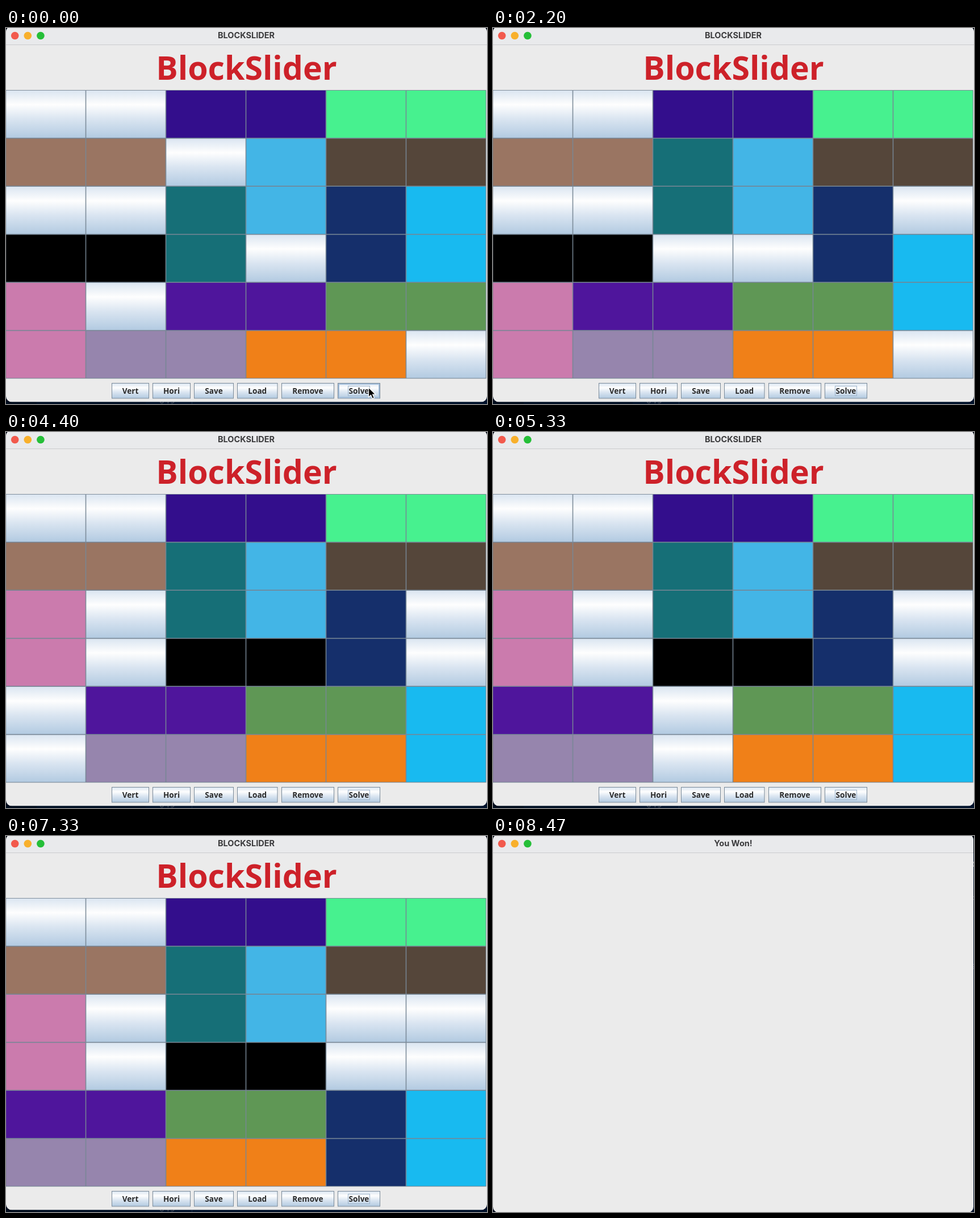
An HTML page for the animation above (8.87 s loop, 847 by 661 pixels).

```html
<!DOCTYPE html>
<html lang="en">
<head>
<meta charset="utf-8">
<title>BlockSlider</title>
<style>
  html, body { margin: 0; width: 100%; height: 100%; overflow: hidden; background: #001e47; }
  svg { display: block; width: 847px; height: 661px; }
  text { white-space: pre; }
  .ui { font-family: Inter, "Open Sans", sans-serif; font-size: 14.5px; }
  .code { font-family: "DejaVu Sans Mono", monospace; font-size: 15.8px; }
  .swing { font-family: "Open Sans", "Noto Sans", sans-serif; font-weight: 700; }
  .icon { fill: none; stroke: #7288a5; stroke-width: 1.6; stroke-linejoin: round; }
</style>
</head>
<body>
<svg id="stage" viewBox="0 0 847 661" xmlns="http://www.w3.org/2000/svg">
  <defs>
    <linearGradient id="ocean" x1="0" y1="0" x2="0" y2="1">
      <stop offset="0" stop-color="#dae5f1"/>
      <stop offset=".3" stop-color="#fefefe"/>
      <stop offset=".6" stop-color="#dae5f1"/>
      <stop offset="1" stop-color="#b2cae1"/>
    </linearGradient>
  </defs>
  <g id="editor"></g>
  <rect id="shade" width="847" height="661" opacity=".4"/>
  <g id="game"></g>
  <g id="won"></g>
  <path id="cursor" d="M0 0V17L4 13.3L6.8 19.6L9.8 18.3L7.1 12.2H12.4Z" stroke="#fff" stroke-width="1.2"/>
</svg>
<script>
const LOOP = 8870;
const $ = id => document.getElementById(id);
const escape = s => s.replace(/&/g, '&amp;').replace(/</g, '&lt;');
const rect = (x, y, w, h, fill, extra = '') =>
  `<rect x="${x}" y="${y}" width="${w}" height="${h}" fill="${fill}" ${extra}/>`;
const circle = (x, y, r, fill, extra = '') => `<circle cx="${x}" cy="${y}" r="${r}" fill="${fill}" ${extra}/>`;
const path = (d, color, width = 1.3) => `<path d="${d}" fill="none" stroke="${color}" stroke-width="${width}"/>`;
const text = (x, y, s, fill, cls = 'ui', extra = '') =>
  `<text x="${x}" y="${y}" fill="${fill}" class="${cls}" ${extra}>${escape(s)}</text>`;
const lights = (...colors) => colors.map((c, i) => circle(15.7 + 22.6 * i, 13.5, 6.8, c)).join('');

// ---- Code editor behind the game ----
const COL = 9.51, LINE = 23.67, CODE_X = 327;
const source = [
  [626, 8, 'this.btn[row2][col2].setBackground(color);'],
  [627, 4, '}'],
  [630, 4, '// MODIFIES: this'],
  [631, 4, '// EFFECTS: find and return the button that is pressed'],
  [632, 4, 'private JButton findButton(ActionEvent e) {'],
  [633, 8, 'int i = 0;'],
  [634, 8, 'int j = 0;'],
  [635, 8, 'for (; i < this.size; i++) {'],
  [636, 12, 'for (; j < this.size; j++) {'],
  [638, 16, 'if (e.getSource() == this.btn[i][j]) {'],
  [639, 20, 'this.currRow = i;'],
  [640, 20, 'this.currColumn = j;'],
  [641, 20, 'return this.btn[i][j];'],
  [642, 16, '}'],
  [644, 12, '}'],
  [645, 12, 'j = 0;'],
  [646, 8, '}'],
  [647, 8, 'return null;'],
  [648, 4, '}']
];
const lineY = n => 109.5 + (n - 626) * LINE;

function highlighter() {
  const brackets = ['#ffd700', '#da70d6', '#2fa4f5'];
  let depth = 2;
  const color = (token, rest) => {
    if (token.startsWith('//')) return '#667bab';
    if (/^[([{]$/.test(token)) return brackets[depth++ % 3];
    if (/^[)\]}]$/.test(token)) return brackets[--depth % 3];
    if (/^(private|int|for|if|return)$/.test(token)) return '#e9d9ff';
    if (/^(\d+|null)$/.test(token)) return '#ffc58f';
    if (/^[A-Z]/.test(token)) return '#ffeead';
    if (/^\w/.test(token)) return rest.startsWith('(') ? '#ffeead' : '#ff9da4';
    return /[=<+]/.test(token) ? '#99ffff' : '#e8efff';
  };
  return line => line.replace(/\/\/.*|\w+|[=<+]+|\s+|./g, (token, at) =>
    `<tspan fill="${color(token, line.slice(at + token.length))}">${escape(token)}</tspan>`);
}

const chevron = (x, y, open) =>
  path(open ? `M${x - 5} ${y - 2.5}l5 5l5 -5` : `M${x - 2.5} ${y - 5}l5 5l-5 5`, '#b9c7da');
const javaMark = (x, y) => text(x, y + 5, 'J', '#cc3e44', 'ui', 'font-weight="700" text-anchor="middle"');

function sidebar() {
  const GOLD = '#d8a02c', PLAIN = '#d5deec';
  // name, depth, kind (d: folder, j: Java file, other: file), colour, badge
  const tree = [
    ['solver.txt', 1, 'text', PLAIN, 'M'], ['testMT.json', 1, 'json'], ['UML_Design_Diagr...', 1, 'pdf'],
    ['won.jpg', 1, 'image'], ['lib', 0, 'closed'], ['src', 0, 'd', GOLD, '●'], ['gui', 1, 'd', GOLD, '●'],
    ['model', 2, 'd', GOLD, '●'], ['Block.java', 3, 'j', GOLD, '1'],
    ...['BlockTranslator....', 'Board.java', 'Event.java', 'EventLog.java', 'Goalblock.java',
      'Horiblock.java', 'Vertblock.java'].map(n => [n, 3, 'j']),
    ['persistence', 2, 'd'],
    ...['Converter.java', 'JsonReader.java', 'JsonWriter.java', 'Translator.java', 'Writable.java'].map(n => [n, 3, 'j']),
    ['ui', 2, 'd', GOLD, '●']
  ];
  const icons = {
    text: y => path(`M85 ${y - 4}h10M85 ${y}h7M85 ${y + 4}h10`, '#c3cfdf', 1.6),
    json: y => text(82, y + 5, '{}', '#cbcb41', 'ui', 'style="font-size:13px"'),
    pdf: y => circle(88, y, 5, '#cc3e44'),
    image: y => rect(82.5, y - 5, 11, 9, 'none', 'stroke="#a074c4" stroke-width="1.5"') +
      path(`M84 ${y + 3}l4 -4l5 4`, '#a074c4', 1.5)
  };
  const rows = tree.map(([name, depth, kind, color = PLAIN, badge], i) => {
    const y = 103 + 24.8 * i, x = 93 + 9 * depth;
    const folder = kind === 'd' || kind === 'closed';
    const mark = folder ? chevron(x - 13, y, kind === 'd') : kind === 'j' ? javaMark(106, y) : icons[kind](y);
    const note = badge === '●' ? circle(222, y, 4.3, '#5b5b46')
      : badge ? text(222, y + 5, badge, badge === '1' ? '#cc5544' : '#8f9271', 'ui', 'text-anchor="middle" style="font-size:13px"') : '';
    return mark + text(x, y + 5, name, color) + note;
  }).join('');
  return rect(54, 30, 192, 631, '#00193c') + rows +
    rect(54, 69, 192, 25, '#14294a') + chevron(66, 81, true) +
    text(77, 86, 'MAZE-SOLVER', '#dce5f2', 'ui', 'style="font-size:12.6px;font-weight:700"') +
    text(77, 54, 'EXPLORER', '#c2cede', 'ui', 'style="font-size:12.8px"') +
    [214, 220, 226].map(x => circle(x, 49, 1.2, '#c2cede')).join('');
}

function activityBar() {
  const icon = d => `<path class="icon" d="${d}"/>`;
  return rect(0, 30, 54, 631, '#00142f') + rect(0, 30, 2, 54, '#fff') +
    `<path class="icon" style="stroke:#fff;stroke-width:2" d="M22 43h10l6 6v14h-16zM22 50h-6v20h15v-7M32 43v6h6"/>` +
    icon('M24 112a8 8 0 1 1 4 3.5M24 112l-9 11') +
    icon('M21 158v16M21 167q12 0 12 -7') +
    [[21, 155], [21, 176], [33, 158]].map(([x, y]) => circle(x, y, 3, 'none', 'class="icon"')).join('') +
    circle(36.5, 174, 8.5, '#2484d8') + text(36.5, 178, '2', '#fff', 'ui', 'text-anchor="middle" style="font-size:11px;font-weight:700"') +
    icon('M24 215v-9l16 10l-11 8M16 226a5 6 0 0 1 10 0a5 6 0 0 1 -10 0M13 220l4 3M13 227h3M14 234l3 -3M28 220l-3 3M26 227h4M25 231l4 3') +
    icon('M14 267h10v19h-10zM14 276h20v10h-20M30 261h10v10h-10z') +
    icon('M26 336h-11v-19h24v9M20 340h7') + circle(34, 334, 6, 'none', 'class="icon"') + icon('M32 331l-2 3l2 3M36 331l2 3l-2 3') +
    icon('M21 370h12M24 370v8l-7 14h20l-7 -14v-8M20 386h14') +
    [435, 490, 544].map(y => circle(27, y, 9, '#566d8d')).join('');
}

function tabsAndPath() {
  const tabs = [[246, 'test.java'], [381, 'AStar.java'], [518, 'Block.java', '1'], [668, 'Board.java'], [808, 'GUI.java']];
  const ends = [380, 517, 667, 807, 947];
  const bar = tabs.map(([x, name, badge], i) =>
    rect(x, 30, ends[i] - x, 39, i === 4 ? '#001e47' : '#00193c') + javaMark(x + 22, 49) +
    text(x + 36, 54.5, name, badge ? '#d8a02c' : i === 4 ? '#fff' : '#8798b2') +
    (badge ? text(628, 54.5, badge, '#d8a02c', 'ui', 'style="font-size:12.5px"') : '')).join('');
  const crumbs = [[264, 'src'], [303, 'gui'], [342, 'ui'], [397, 'GUI.java'], [493, 'GUI'], [557, 'findButton(ActionEvent)']];
  return rect(246, 30, 601, 39, '#001126') + bar +
    crumbs.map(([x, s]) => text(x, 87, s, '#a0afc5')).join('') +
    [294, 333, 364, 463, 528].map(x => chevron(x, 82, false)).join('') + javaMark(384, 82) +
    path('M474 79l4 -4l4 4l-4 4zM480 79h7M482 79v8h5M485 76h4v5h-4zM485 84h4v5h-4z', '#e59a3c') +
    path('M545 75l6 3v8l-6 4l-6 -4v-8zM539 78l6 4l6 -4M545 82v8', '#b180d7');
}

function drawEditor() {
  const paint = highlighter();
  const numbers = Array.from({ length: 24 }, (_, i) =>
    text(298, lineY(626 + i) + 6, String(626 + i), 626 + i === 646 ? '#a2aebf' : '#64758e', 'code', 'text-anchor="end"')).join('');
  const guides = [[327, 94, 661], [365, 94, 121], [365, 263, 619], [403, 334, 572], [441, 358, 525], [480, 405, 477]]
    .map(([x, a, b]) => path(`M${x + .5} ${a}V${b}`, '#24466f', 1)).join('');
  const code = source.map(([n, col, s]) =>
    `<text class="code" x="${CODE_X + col * COL}" y="${lineY(n) + 6}">${paint(s)}</text>`).join('');
  const dots = Array.from({ length: 8 }, (_, i) => circle(332 + i * COL, 584, 1, '#47658f')).join('');
  $('editor').innerHTML = rect(0, 0, 847, 661, '#001e47') +
    rect(328, 572, 85, 23, '#002c62') + rect(498, 548, 9, 24, '#002c62') +
    numbers + guides + dots + code +
    circle(337, 555, 5.3, '#fdb515') + rect(334.5, 559, 5, 6, '#fdb515') + rect(336, 561, 2, 2, '#001e47') +
    rect(812, 94, 40, 37, '#001634') + rect(812, 94, 2, 37, '#17325a') + chevron(826, 113, false) + text(843, 117, 'F', '#78899f') +
    rect(0, 0, 847, 30, '#000f22') + lights('#2a3440', '#2a3440', '#2a3440') +
    sidebar() + activityBar() + tabsAndPath();
}

// ---- Game window ----
const titleBar = title => rect(0, 0, 847, 29, '#e9eaec') + rect(0, 29, 847, 1, '#cacbcd') +
  lights('#f25a4d', '#f8b02c', '#25bf38') +
  text(423, 18.3, title, '#3b3b3d', 'ui', 'text-anchor="middle" style="font-size:14.5px;font-weight:700"');
const framed = (id, w, h, inner) =>
  `<clipPath id="${id}"><rect y="-3" width="${w}" height="${h + 3}" rx="10"/></clipPath>
   <g clip-path="url(#${id})">${rect(0, -3, w, h + 3, '#ebebeb')}${inner}</g>`;

const BORDER = 'stroke="#7a8a99"';
// Neighbouring cells share an edge, each with its own thin border inside it.
const cellBox = (r, c) =>
  rect(141 * c - .1, 109.6 + 84.5 * r, 140.2, 83.7, 'url(#ocean)', 'class="cell" stroke="#728291" stroke-width=".8"');

// colour, row, column, vertical
const blocks = {
  indigo: ['#330e8c', 0, 2], mint: ['#47f18f', 0, 4], brown: ['#9a7562', 1, 0], umber: ['#55463a', 1, 4],
  sky: ['#43b5e6', 1, 3, true], teal: ['#166f77', 2, 2, true], navy: ['#152f6b', 2, 4, true],
  cyan: ['#18baf0', 2, 5, true], goal: ['#000', 3, 0], pink: ['#cb7bad', 4, 0, true],
  violet: ['#4f159c', 4, 2], green: ['#5f9755', 4, 4], lilac: ['#9685ad', 5, 1], orange: ['#f08018', 5, 3]
};
// time, block, row step, column step
const moves = [
  [270, 'teal', -1, 0], [800, 'violet', 0, -1], [1270, 'green', 0, -1], [1800, 'cyan', 1, 0],
  [2330, 'cyan', 1, 0], [2800, 'goal', 0, 1], [3330, 'goal', 0, 1], [3800, 'pink', -1, 0],
  [4330, 'pink', -1, 0], [4800, 'violet', 0, -1], [5330, 'lilac', 0, -1], [5800, 'green', 0, -1],
  [6330, 'orange', 0, -1], [6870, 'navy', 1, 0], [7330, 'navy', 1, 0], [7870, 'goal', 0, 1]
];

function drawGame() {
  const buttons = [['Vert', 186, 252], ['Hori', 258, 325], ['Save', 331, 401], ['Load', 407, 478.5], ['Remove', 485, 578], ['Solve', 584, 659]];
  let grid = '';
  for (let i = 0; i < 36; i++) grid += cellBox(Math.floor(i / 6), i % 6);
  const row = buttons.map(([name, a, b]) =>
    rect(a + .5, 624.5, b - a - 1, 26.5, 'url(#ocean)', BORDER) +
    text((a + b) / 2, 643, name, '#2b2b2b', 'swing', 'text-anchor="middle" font-size="13.6"')).join('');
  $('game').innerHTML = framed('gameClip', 847, 657.5, titleBar('BLOCKSLIDER') +
    text(423.5, 91, 'BlockSlider', '#cd2129', 'swing', 'text-anchor="middle" font-size="57.2"') +
    rect(0, 109.3, 845.5, 507, '#95a1ac') + grid + row +
    rect(602.5, 629.5, 38, 17, 'none', 'stroke="#9db4cb"') +
    rect(586, 626, 71, 23.5, 'none', 'id="hover" stroke="#a3bedb" stroke-width="2"'));
  $('won').innerHTML = framed('wonClip', 846, 662, titleBar('You Won!'));
}

drawEditor();
drawGame();
const cells = [...document.querySelectorAll('.cell')];
const show = (id, on) => $(id).setAttribute('visibility', on ? 'visible' : 'hidden');

function boardAt(t) {
  const fills = Array(36).fill('url(#ocean)');
  for (const [name, [color, row, col, vertical]] of Object.entries(blocks)) {
    let at = row * 6 + col;
    for (const [time, who, dr, dc] of moves) if (who === name && t >= time) at += dr * 6 + dc;
    fills[at] = fills[at + (vertical ? 6 : 1)] = color;
  }
  return fills;
}

function render(t) {
  const playing = t < 8330, won = t >= 8400;
  show('game', playing);
  show('shade', playing || won);
  show('won', won);
  if (playing) boardAt(t).forEach((fill, i) => cells[i].setAttribute('fill', fill));
  const opening = t < 8470;
  $('won').setAttribute('opacity', opening ? .75 : 1);
  $('won').setAttribute('transform', opening ? 'translate(423 330) scale(.97) translate(-423 -330)' : '');

  const leave = Math.min(1, Math.max(0, (t - 1000) / 270));
  const y = 632 + 30 * leave * leave;
  $('cursor').setAttribute('transform', `translate(638.5 ${y})`);
  show('cursor', leave < 1);
  show('hover', playing && y < 651 && leave < 1);
}

const start = performance.now();
function tick() {
  render((performance.now() - start) % LOOP);
  requestAnimationFrame(tick);
}
render(0);
requestAnimationFrame(tick);
</script>
</body>
</html>
```
